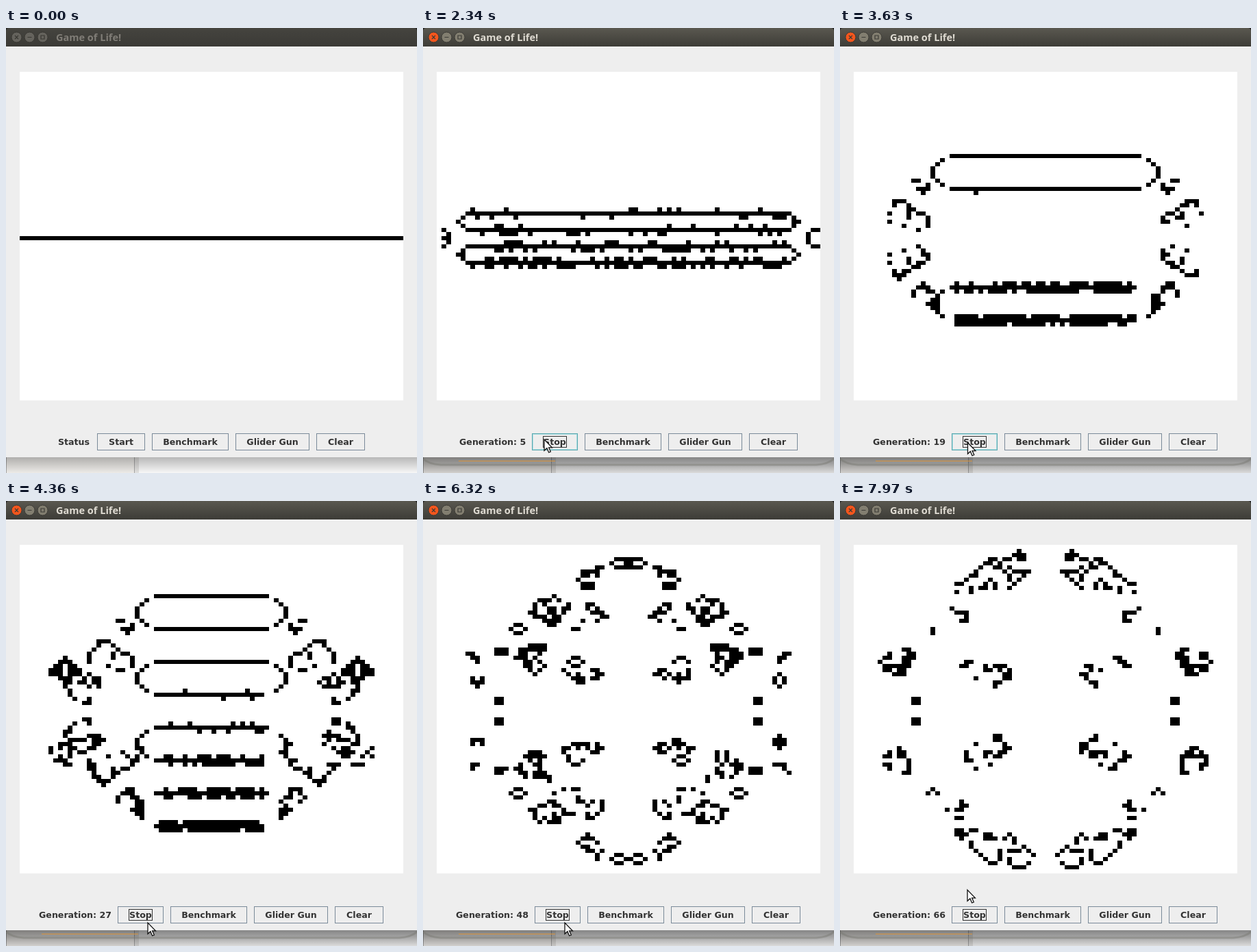
Animation, 600 px wide and 650 px high, one loop 8 s. Source, as an HTML page:

```html
<!DOCTYPE html>
<html lang="en">
<head>
<meta charset="utf-8">
<title>Game of Life!</title>
<style>
html, body { margin: 0; width: 100%; height: 100%; overflow: hidden; background: #eee; }
svg { display: block; width: 600px; height: 650px; }
.ui text { font: bold 12.6px "DejaVu Sans", sans-serif; fill: #333; }
.title { font: bold 14.5px "Open Sans", "Noto Sans", sans-serif; }
.crisp { shape-rendering: crispEdges; }
</style>
</head>
<body>
<svg viewBox="0 0 600 650">
  <defs>
    <linearGradient id="barOff" x2="0" y2="1"><stop stop-color="#45443f"/><stop offset="1" stop-color="#3b3a36"/></linearGradient>
    <linearGradient id="barOn" x2="0" y2="1"><stop stop-color="#5a5850"/><stop offset="1" stop-color="#3d3c37"/></linearGradient>
    <linearGradient id="shadeOff" x2="0" y2="1"><stop stop-color="#000" stop-opacity=".27"/><stop offset="1" stop-color="#000" stop-opacity=".02"/></linearGradient>
    <linearGradient id="shadeOn" x2="0" y2="1"><stop stop-color="#000" stop-opacity=".47"/><stop offset=".4" stop-color="#000" stop-opacity=".36"/><stop offset="1" stop-color="#000" stop-opacity=".13"/></linearGradient>
  </defs>
  <rect width="600" height="650" fill="#eee"/>
  <g id="idle"></g>
  <g id="live"></g>
  <rect x="20" y="64" width="560" height="480" fill="#fff"/>
  <path id="cells" class="crisp"/>
  <g class="ui">
    <text id="label" y="609"></text>
    <g id="buttons"></g>
  </g>
  <path id="cursor" d="M0 0V16.2L3.9 12.7 6.6 19 9.3 17.8 6.6 11.8H11.4Z" fill="#fff" stroke="#111" stroke-width="1.3"/>
</svg>
<script>
const $ = id => document.getElementById(id);
const LOOP = 8000, SIZE = 80, CELL_W = 7, CELL_H = 6;
const STEP = 92, START = 1692, LAST = 69;

// Window frame, drawn once inactive and once active.
function frame(on) {
  const ink = on ? '#3c3b36' : '#393833';
  const knob = on ? '#827e70' : '#65635d';
  const circles = [15, 34, 53].map((x, i) =>
    `<circle cx="${x + .5}" cy="13.5" r="7.5" fill="${on && !i ? '#f4561d' : knob}" stroke="${ink}"/>`).join('');
  const extra = on
    ? `<path d="M0 629Q8 637 26 638H574Q592 637 600 629" fill="none" stroke="#777570" stroke-opacity=".45" stroke-width="3"/>
       <path class="crisp" d="M52 632.5H193" stroke="#d9943f"/>`
    : '';
  return `<path d="M0 0H600V27H0Z" fill="#222"/>
    <path d="M0 27V5Q0 0 5 0H595Q600 0 600 5V27Z" fill="url(#bar${on ? 'On' : 'Off'})"/>
    ${circles}
    <path d="M13 11l5 5m0-5l-5 5M31.5 13.5h6M51 11h5v5h-5z" fill="none" stroke="${ink}" stroke-width="1.2"/>
    <text class="title" x="73" y="19" fill="${on ? '#dfdbd2' : '#807d77'}">Game of Life!</text>
    <rect y="627" width="600" height="23" fill="#fcfcfc"/>
    <rect y="627" width="187" height="23" fill="#f1efec"/>
    <rect x="188" y="627" width="6" height="23" fill="#e6e5e3"/>
    <path class="crisp" d="M.5 627V650M187.5 627V650" stroke="#aaa"/>
    <rect y="627" width="600" height="23" fill="url(#shade${on ? 'On' : 'Off'})"/>${extra}`;
}

// All generations, on a board with dead edges.
function evolve(board) {
  const at = (x, y) => x < 0 || y < 0 || x >= SIZE || y >= SIZE ? 0 : board[y * SIZE + x];
  return board.map((alive, i) => {
    const x = i % SIZE, y = (i - x) / SIZE;
    let sum = -alive;
    for (let dy = -1; dy < 2; dy++)
      for (let dx = -1; dx < 2; dx++) sum += at(x + dx, y + dy);
    return sum === 3 || (alive && sum === 2) ? 1 : 0;
  });
}
const gens = [new Uint8Array(SIZE * SIZE).fill(1, 40 * SIZE, 41 * SIZE)];
while (gens.length <= LAST) gens.push(evolve(gens[gens.length - 1]));

function noise(x, y, n) {
  const v = Math.sin(x * 12.9898 + y * 78.233 + n * 37.7) * 43758.5453;
  return v - Math.floor(v);
}

// Cells repaint in scattered order, odd turns from below, even ones from above.
function cellPath(n, phase) {
  const next = gens[n], prev = gens[Math.max(0, n - 1)];
  const side = n % 2 ? 1 : -1;
  let d = '';
  for (let y = 0; y < SIZE; y++) {
    const share = phase < 1 ? .2 + .65 * phase + side * (y - 40) / 40 : 1;
    let run = 0;
    for (let x = 0; x <= SIZE; x++) {
      const i = y * SIZE + x;
      const alive = x < SIZE && (noise(x, y, n) < share ? next : prev)[i];
      if (alive) run++;
      else if (run) {
        d += `M${20 + (x - run) * CELL_W} ${64 + y * CELL_H}h${run * CELL_W}v${CELL_H}h${-run * CELL_W}z`;
        run = 0;
      }
    }
  }
  return d;
}

const ease = p => p * p * (3 - 2 * p);
const moves = [
  [770, 1330, 325, 546, 177, 601],
  [3500, 3850, 177, 601, 207, 616],
  [6850, 7250, 207, 616, 186, 568]
];
function pointer(t) {
  let pos = [325, 546];
  for (const [from, to, x0, y0, x1, y1] of moves) {
    if (t < from) break;
    const p = ease(Math.min(1, (t - from) / (to - from)));
    pos = [x0 + (x1 - x0) * p, y0 + (y1 - y0) * p];
  }
  return pos;
}

function button(name, x, w, focus, hover, running) {
  let s = `<rect class="crisp" x="${x + .5}" y="592.5" width="${w - 1}" height="24" fill="#eee" stroke="${hover && running ? '#5ba7ae' : '#7a8a99'}"/>`;
  if (hover) s += running
    ? `<rect class="crisp" x="${x + 1.5}" y="593.5" width="${w - 3}" height="22" fill="none" stroke="#a9dde2"/>`
    : `<path class="crisp" d="M${x + 1.5} 616V593.5H${x + w - 1}" fill="none" stroke="#7a8a99"/>`;
  s += `<text x="${x + w / 2}" y="609" text-anchor="middle">${name}</text>`;
  if (focus) s += `<rect class="crisp" x="${x + 16.5}" y="596.5" width="${w - 33}" height="16" fill="none" stroke="#333"/>`;
  return s;
}

function controls(t, n, [px, py]) {
  const running = t >= 1750;
  const counting = n >= 1;
  const count = String(Math.max(0, n - 2));
  const labelW = counting ? 87 + 9 * count.length : 47;
  const items = [running ? ['Stop', 67] : ['Start', 70], ['Benchmark', 112], ['Glider Gun', 108], ['Clear', 71]];
  const total = items.reduce((sum, item) => sum + 10 + item[1], labelW);
  let x = Math.floor((600 - total) / 2);
  $('label').setAttribute('x', x);
  $('label').textContent = counting ? 'Generation: ' + count : 'Status';
  x += labelW + 10;
  $('buttons').innerHTML = items.map(([name, w], i) => {
    const focus = t >= 395 && i === (running ? 0 : 1);
    const hover = t >= 395 && px >= x && px < x + w && py >= 592 && py < 615;
    const s = button(name, x, w, focus, hover, running);
    x += w + 10;
    return s;
  }).join('');
}

function draw(t) {
  const turn = (t - START) / STEP;
  const n = Math.max(0, Math.min(LAST, Math.floor(turn)));
  const phase = n ? (turn - n) * 2 : 1;
  const pos = pointer(t);
  $('live').setAttribute('opacity', t < 350 ? 0 : t < 395 ? .6 : 1);
  $('cells').setAttribute('d', cellPath(n, phase));
  controls(t, n, pos);
  $('cursor').setAttribute('transform', `translate(${pos})`);
  $('cursor').setAttribute('visibility', t < 395 ? 'hidden' : 'visible');
}

$('idle').innerHTML = frame(false);
$('live').innerHTML = frame(true);
const begin = performance.now();
function tick() {
  draw((performance.now() - begin) % LOOP);
  requestAnimationFrame(tick);
}
draw(0);
requestAnimationFrame(tick);
</script>
</body>
</html>
```
